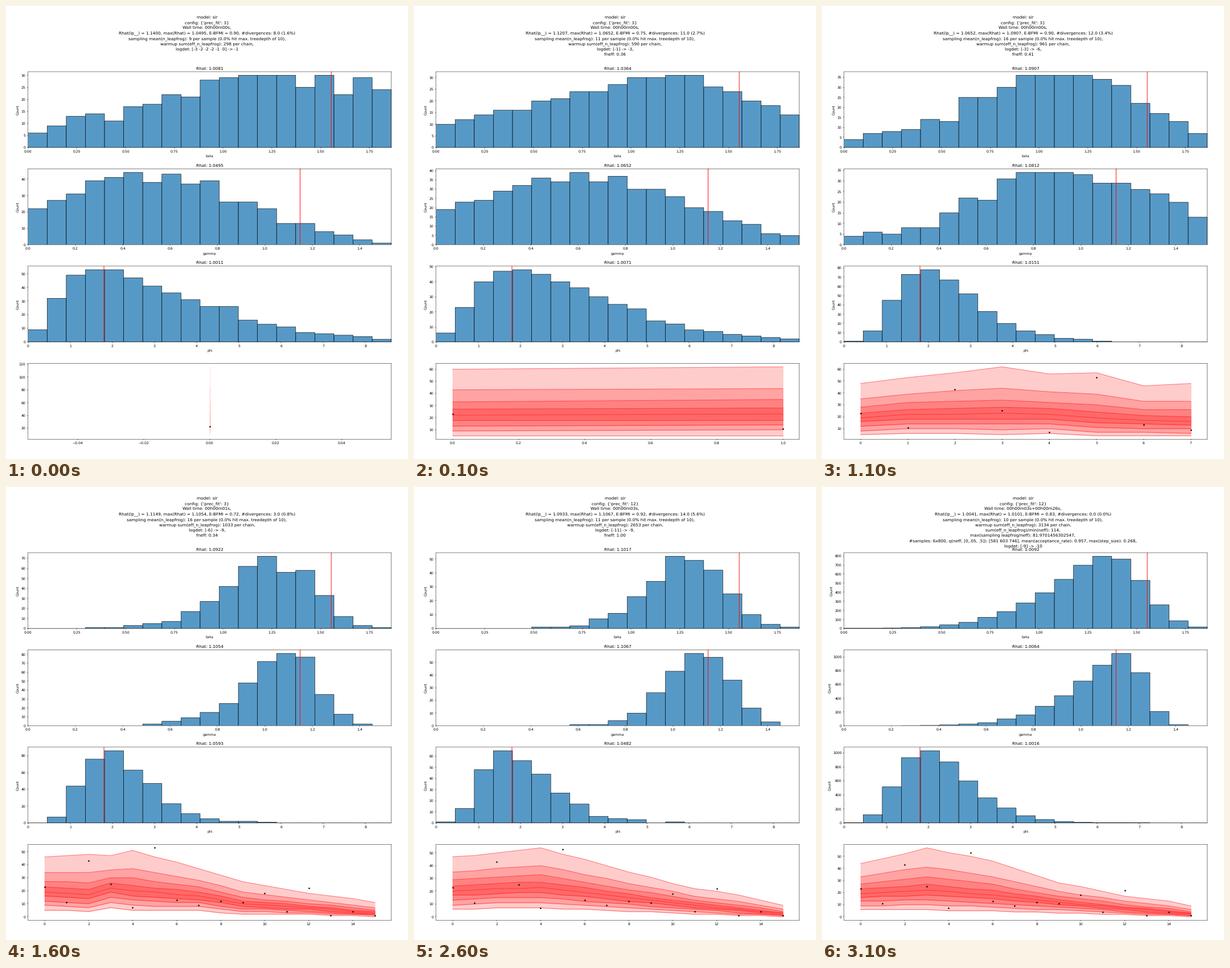
Write a matplotlib script that moves like this. It is 706 px wide and 794 px high and loops after 3600 ms.

```python
import numpy as np
import matplotlib.pyplot as plt
from matplotlib.animation import FuncAnimation

W, H, DPI = 706, 794, 44.125
BINS = 19
LEFT, TOP, PITCH, WIDTH, HEIGHT = 38.7, 115.1, 170.4, 638, 133
# name, right end of the x axis, true value
PARAMS = (("beta", 1.8624, 1.5544), ("gamma", 1.534, 1.1486), ("phi", 8.613, 1.8))
OBSERVED = [23, 11, 43, 25, 7, 53, 13, 9, 12, 11, 18, 4, 22, 1, 4, 1]
# quantile lines relative to the median
RATIOS = np.array([2.48, 1.82, 1.46, 1.2, 1, .82, .64, .45, .27])

plt.rcParams.update({
    "font.family": "DejaVu Sans",
    "text.hinting": "none",
    "figure.facecolor": "white",
})
rng = np.random.default_rng(4)
fig = plt.figure(figsize=(16, 17.995), dpi=DPI)
scenes = []


def sampled(shape, peak, mode):
    """Counts scattered around a smooth shape, highest at the mode."""
    noisy = peak * shape + .5 * np.sqrt(peak * shape) * rng.standard_normal(BINS)
    heights = np.clip(np.round(noisy), 0, peak)
    heights[int(mode)] = peak
    return heights


def skewed(peak, mode, left, right):
    """Bell with a long left tail and a steep right side."""
    d = np.arange(BINS) - mode
    fall = np.where(d < 0, np.abs(d / left) ** 1.5, np.abs(d / right) ** 2.5)
    return sampled(np.exp(-fall / 2), peak, mode)


def gamma_like(peak, mode, power):
    u = (np.arange(BINS) + .5) / mode
    return sampled((u * np.exp(1 - u)) ** power, peak, mode)


def posterior(beta, gamma, phi):
    return np.array([skewed(*beta), skewed(*gamma), gamma_like(*phi)])


def fan(*points):
    """Quantile lines through (day, median, spread) key points."""
    day, median, spread = np.transpose(points)
    days = np.arange(day[-1] + 1)
    power = np.interp(days, day, spread)
    return np.round(np.interp(days, day, median) * RATIOS[:, None] ** power)


def blend(a, b):
    return np.round((a + b) / 2)


def header(fit, wall, lp, top, bfmi, div, leap, warm, *rest):
    return ["model: sir",
            f"config: {{'prec_fit': {fit}}}",
            f"Wall time: {wall},",
            f"Rhat(lp__) = {lp}, max(Rhat) = {top}, E-BFMI = {bfmi}, #divergences: {div}",
            f"sampling mean(n_leapfrog): {leap} per sample (0.0% hit max. treedepth of 10),",
            f"warmup sum(eff_n_leapfrog): {warm} per chain,",
            *rest]


def add_axes(row):
    bottom = TOP + PITCH * row + HEIGHT
    ax = fig.add_axes([LEFT / W, 1 - bottom / H, WIDTH / W, HEIGHT / H])
    ax.spines[:].set_snap(False)
    return ax


def histogram(ax, heights, param, rhat):
    name, end, truth = param
    edges = np.linspace(0, end, BINS + 1)
    ax.bar(edges[:-1], heights, width=end / BINS, align="edge", snap=False,
           facecolor=(.122, .467, .706, .75), edgecolor="black", linewidth=1)
    ax.axvline(truth, color="red", snap=False)
    ax.set(xlim=(0, end), xlabel=name, ylabel="Count", title=f"Rhat: {rhat}")


def ribbon(ax, rows):
    days = np.arange(rows.shape[1])
    for k in range(4):
        ax.fill_between(days, rows[8 - k], rows[k], color="red", alpha=.2)
    for row in rows:
        ax.plot(days, row, color="red", alpha=.5)
    ax.plot(days, OBSERVED[:len(days)], "k.")


def scene(lines, rhats, hists, rows):
    parts = [fig.text(.5, 1 - (21.9 + 9.27 * i) / H, line, size=12,
                      ha="center", va="baseline", parse_math=False)
             for i, line in enumerate(lines)]
    axes = [add_axes(row) for row in range(4)]
    for ax, heights, param, rhat in zip(axes, hists, PARAMS, rhats):
        histogram(ax, heights, param, rhat)
    ribbon(axes[3], rows)
    scenes.append(parts + axes)


days1 = posterior((30, 11, 5.5, 10), (44, 5, 4.4, 6), (53, 4, 1.4))
days4 = posterior((32, 12, 8, 3.2), (35, 10, 8, 5), (44, 4.9, 2.4))
days8 = posterior((36, 10, 3.8, 5), (34, 10, 3.7, 6.5), (78, 4.3, 4.4))
coarse = posterior((72, 12, 1.9, 2.4), (81, 13, 1.8, 1.8), (86, 4.2, 6.5))
fine = posterior((52, 12, 1.5, 2.5), (57, 13, 1.3, 2), (65, 3.8, 5))
final = posterior((795, 13, 2.4, 2.2), (1050, 14, 2.1, 1.25), (1030, 4.3, 5.5))

coarse_fan = fan((0, 19, .97), (2, 17, 1.14), (3, 22, .84), (4, 20, 1.03),
                 (7, 16, .93), (9, 10, 1.08), (12, 7, 1.05), (15, 3, 1.4))
fine_fan = fan((0, 20, .94), (2, 22, .9), (4, 23, .94), (8, 15, .94),
               (11, 9, .98), (15, 2.6, 1.37))
final_fan = fan((0, 19.2, .92), (3, 22.3, 1.03), (6, 18, 1.03), (9, 12, .95),
                (12, 7, 1), (15, 2.6, 1.37))

scene(header(3, "00h00m00s", "1.1400", "1.0495", "0.90", "8.0 (1.6%)", 9, 298,
             "logdet: [-3 -2 -2 -2 -1  0] -> -1"),
      ("1.0081", "1.0495", "1.0011"), days1,
      np.geomspace(116, 8.2, 9)[:, None])

scene(header(3, "00h00m00s", "1.1207", "1.0652", "0.75", "11.0 (2.7%)", 11, 590,
             "logdet: [-1] -> -3,", "fneff: 0.36"),
      ("1.0364", "1.0652", "1.0071"), blend(days1, days4),
      fan((0, 22, 1.1), (1, 23, 1.1)))

scene(header(3, "00h00m00s", "1.1013", "1.0809", "0.59", "14.0 (3.8%)", 13, 882,
             "logdet: [-3] -> -3,", "fneff: 0.38"),
      ("1.0646", "1.0809", "1.0131"), days4,
      fan((0, 21, .78), (1, 24.5, .82), (2, 28, 1.08), (3, 30, .86)))

scene(header(3, "00h00m00s", "1.0652", "1.0907", "0.90", "12.0 (3.4%)", 16, 961,
             "logdet: [-3] -> -6,", "fneff: 0.41"),
      ("1.0907", "1.0812", "1.0151"), days8,
      fan((0, 19, 1.02), (1, 22, .97), (3, 22.7, 1.1), (4, 22, 1.03),
          (5, 19, 1.2), (6, 17, 1.1), (7, 16.5, 1.17)))

scene(header(3, "00h00m01s", "1.1149", "1.1054", "0.72", "3.0 (0.8%)", 16, 1033,
             "logdet: [-6] -> -9,", "fneff: 0.34"),
      ("1.0922", "1.1054", "1.0593"), coarse, coarse_fan)

scene(header(6, "00h00m02s", "1.1041", "1.1061", "0.82", "8.0 (2.7%)", 13, 1843,
             "logdet: [-9] -> -11,", "fneff: 0.67"),
      ("1.0970", "1.1061", "1.0538"), blend(coarse, fine),
      blend(coarse_fan, fine_fan))

scene(header(12, "00h00m03s", "1.0933", "1.1067", "0.92", "14.0 (5.6%)", 11, 2653,
             "logdet: [-11] -> -9,", "fneff: 1.00"),
      ("1.1017", "1.1067", "1.0482"), fine, fine_fan)

scene(header(12, "00h00m03s+00h00m26s", "1.0041", "1.0101", "0.83", "0.0 (0.0%)", 10, 3134,
             "sum(eff_n_leapfrog)/min(neff): 114,",
             "max(sampling leapfrog/neff): 81.9701456302547,",
             "#samples: 6x800, q(neff, [0,.05, .5]): [581 603 746], "
             "mean(acceptance_rate): 0.957, max(step_size): 0.268,",
             "logdet: [-9] -> -10"),
      ("1.0092", "1.0064", "1.0016"), final, final_fan)


def update(frame):
    # the opening scene lasts one tick, every later one five
    current = (frame + 4) // 5
    for i, parts in enumerate(scenes):
        for part in parts:
            part.set_visible(i == current)
    return []


anim = FuncAnimation(fig, update, frames=36, interval=100, repeat=True,
                     init_func=lambda: update(0), blit=False)
plt.show()
```
